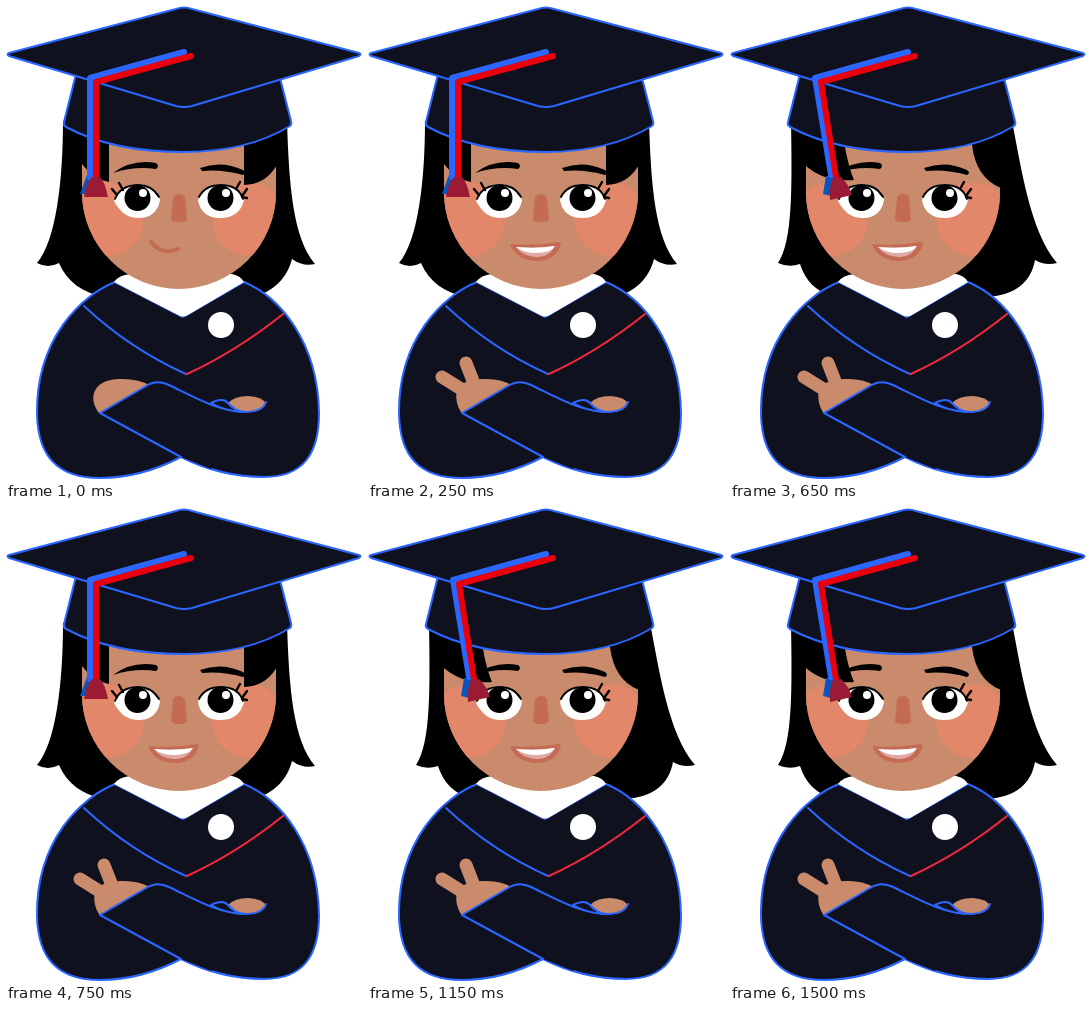
An HTML page that plays this animation: 356x474 px, repeating every 1750 ms.

```html
<!DOCTYPE html>
<html lang="en">
<head>
<meta charset="utf-8">
<title>Graduate</title>
<style>
  html, body { margin: 0; width: 100%; height: 100%; overflow: hidden; background: #fff; }
  svg { display: block; width: 100%; height: 100%; }

  .gown { fill: #10111f; }
  .edge { stroke: #2a66ff; stroke-width: 2; stroke-linejoin: round; stroke-linecap: round; }
  .line { fill: none; }
  .skin { fill: #c98b6b; }
  .blush { fill: #e2876a; }
  .lip { fill: #c46b54; }
  .cord { fill: none; stroke-width: 6; stroke-linecap: round; stroke-linejoin: round; }
  .blue { stroke: #2a66ff; }
  .red { stroke: #e8000d; }
  .lash { fill: none; stroke: #000; stroke-width: 2.4; stroke-linecap: round; }
  .finger { stroke: #c98b6b; stroke-width: 13; stroke-linecap: round; }

  /* Poses switch hard, every 250 ms */
  .calm, .cheer, .still, .swing { animation: 1750ms step-end infinite; }
  .calm { animation-name: calm; }
  .cheer { animation-name: cheer; }
  .still { animation-name: still; }
  .swing { animation-name: swing; }
  @keyframes calm { 0% { visibility: visible } 14.2857%, 100% { visibility: hidden } }
  @keyframes cheer { 0% { visibility: hidden } 14.2857%, 100% { visibility: visible } }
  @keyframes still {
    0%, 42.8571%, 71.4286% { visibility: visible }
    28.5714%, 57.1429%, 85.7143%, 100% { visibility: hidden }
  }
  @keyframes swing {
    0%, 42.8571%, 71.4286% { visibility: hidden }
    28.5714%, 57.1429%, 85.7143%, 100% { visibility: visible }
  }
</style>
</head>
<body>
<svg viewBox="0 0 356 474">
  <defs>
    <clipPath id="face"><path d="M76 110V186A97 97 0 0 0 270 186V110Z"/></clipPath>
  </defs>

  <!-- hair behind the head -->
  <path class="still" d="M57 115C57 175 50 235 31 257Q42 263 53 257C61 276 77 287 99 291H246C268 286 281 272 286 253Q297 261 309 258C287 232 283 180 281 115Z"/>
  <path class="swing" d="M61 115C62 180 63 235 48 257Q59 262 70 258C75 274 86 286 104 291H257C286 289 301 276 305 254Q315 260 327 257C300 226 291 160 282 115Z"/>

  <!-- gown -->
  <path class="gown edge" d="M109 276C76 289 30 332 31 408C32 451 52 472 94 472C127 472 154 462 175 451C201 464 228 471 258 471C298 471 313 447 313 407C312 336 274 291 238 276L177 311Z"/>
  <path fill="#fff" d="M108 276Q113 269 124 268H226Q235 270 238 276L182 309Q177 312 172 309Z"/>
  <path class="line edge" d="M78 300Q124 343 180 368"/>
  <path class="line edge" style="stroke:#f5283c" d="M181 368Q231 345 277 308"/>
  <circle cx="215" cy="319" r="13" fill="#fff"/>

  <!-- hands and arms -->
  <path class="calm skin" d="M94 408C81 393 87 374 112 373Q130 372 144 379Z"/>
  <g class="cheer">
    <path class="skin" d="M94 408Q86 396 89 384Q95 373 115 373Q131 372 144 379Z"/>
    <path class="finger" d="M74 371L98 386M98 357L107 380"/>
  </g>
  <path class="skin" d="M222 397Q229 390 242 390Q256 391 260 397Q257 406 243 406H228Z"/>
  <path class="gown" d="M94 407L140 380Q151 373 163 379C188 391 205 402 228 405L205 463L175 451Z"/>
  <path class="line edge" d="M175 451L94 407L140 380Q151 373 163 379C188 391 213 406 241 406Q257 405 260 396"/>
  <path class="gown edge" d="M205 397Q217 391 222 397Q228 404 237 406Q219 405 205 397Z"/>

  <!-- face -->
  <g clip-path="url(#face)">
    <rect class="skin" x="70" y="105" width="210" height="180"/>
    <circle class="blush" cx="101" cy="213" r="37"/>
    <circle class="blush" cx="243" cy="213" r="37"/>
    <g class="still">
      <path d="M76 110H103V176Q87 173 76 158Z"/>
      <path d="M238 110H271V159Q259 179 238 179Z"/>
    </g>
    <g class="swing">
      <path d="M76 110H111Q115 153 124 174Q94 176 76 160Z"/>
      <path d="M241 110H271V182Q246 172 242 139Z"/>
    </g>
  </g>
  <path d="M107 167Q126 153 150 157Q154 160 150 163Q128 160 107 167Z"/>
  <path d="M194 162Q216 154 237 164Q241 167 237 169Q216 163 196 165Z"/>

  <g>
    <path fill="#fff" d="M108 195C111 184 120 178 132 178C144 178 152 185 154 194C152 206 144 212 133 212C121 212 114 206 108 195Z"/>
    <path fill="#fff" d="M192 194C194 185 203 178 215 178C227 178 235 185 238 194C235 206 227 212 214 212C202 212 194 206 192 194Z"/>
    <g class="lash" style="stroke-width:1.8">
      <path d="M109 193C113 183 121 179 132 179Q146 179 153 191M193 191Q199 179 215 179C226 179 234 184 237 193"/>
    </g>
    <circle cx="131.5" cy="192" r="13"/>
    <circle cx="214.5" cy="192" r="13"/>
    <circle cx="137" cy="187" r="4" fill="#fff"/>
    <circle cx="220" cy="187" r="4" fill="#fff"/>
    <path class="lash still" d="M106 183L111 189M113 177L117 184"/>
    <path class="lash" d="M234 176L230 183M241 183L236 190M236 191L241 192"/>
  </g>

  <path class="lip" d="M167 192Q168 188 173 188Q178 188 179 192L181 213Q181 216 173 216Q165 216 165 213Z"/>
  <path class="calm line" stroke="#c46b54" stroke-width="4" stroke-linecap="round" d="M145 236Q156 250 172 243"/>
  <g class="cheer">
    <path class="lip" d="M142 238Q168 240 191 236Q194 237 192 241Q186 255 168 255Q148 254 142 238Z"/>
    <path fill="#dfa9a8" d="M148 241Q169 243 187 240Q181 252 168 251Q154 250 148 241Z"/>
    <path fill="#fff" d="M148 241Q169 243 187 240Q183 247 168 247Q156 247 148 241Z"/>
  </g>

  <!-- cap -->
  <path class="gown edge" d="M70 68L58 116Q57 119 60 121C92 138 132 146 177 146C219 146 256 137 284 120Q286 118 285 115L274 72Z"/>
  <path class="gown edge" d="M3 47L170 3Q178 0 186 3L353 47Q356 48 353 50L186 100Q178 102 170 100L3 50Q0 48 3 47Z"/>

  <!-- tassel -->
  <g class="still">
    <path fill="#0b54bd" d="M81 169H88L84 188H74Z"/>
    <path class="cord blue" d="M178 46L84 72V171"/>
    <path class="cord red" d="M185 50L90 76V172"/>
    <path fill="#9a1b33" d="M86 171H94Q99 176 102 191H78Q80 177 86 171Z"/>
  </g>
  <g class="swing">
    <path fill="#0b54bd" d="M96 170H103L105 191L93 188Z"/>
    <path class="cord blue" d="M178 46L85 72L101 169"/>
    <path class="cord red" d="M185 50L91 76L106 171"/>
    <path fill="#9a1b33" d="M103 172L111 171Q118 177 122 189L100 194Q99 181 103 172Z"/>
  </g>
</svg>
</body>
</html>
```
